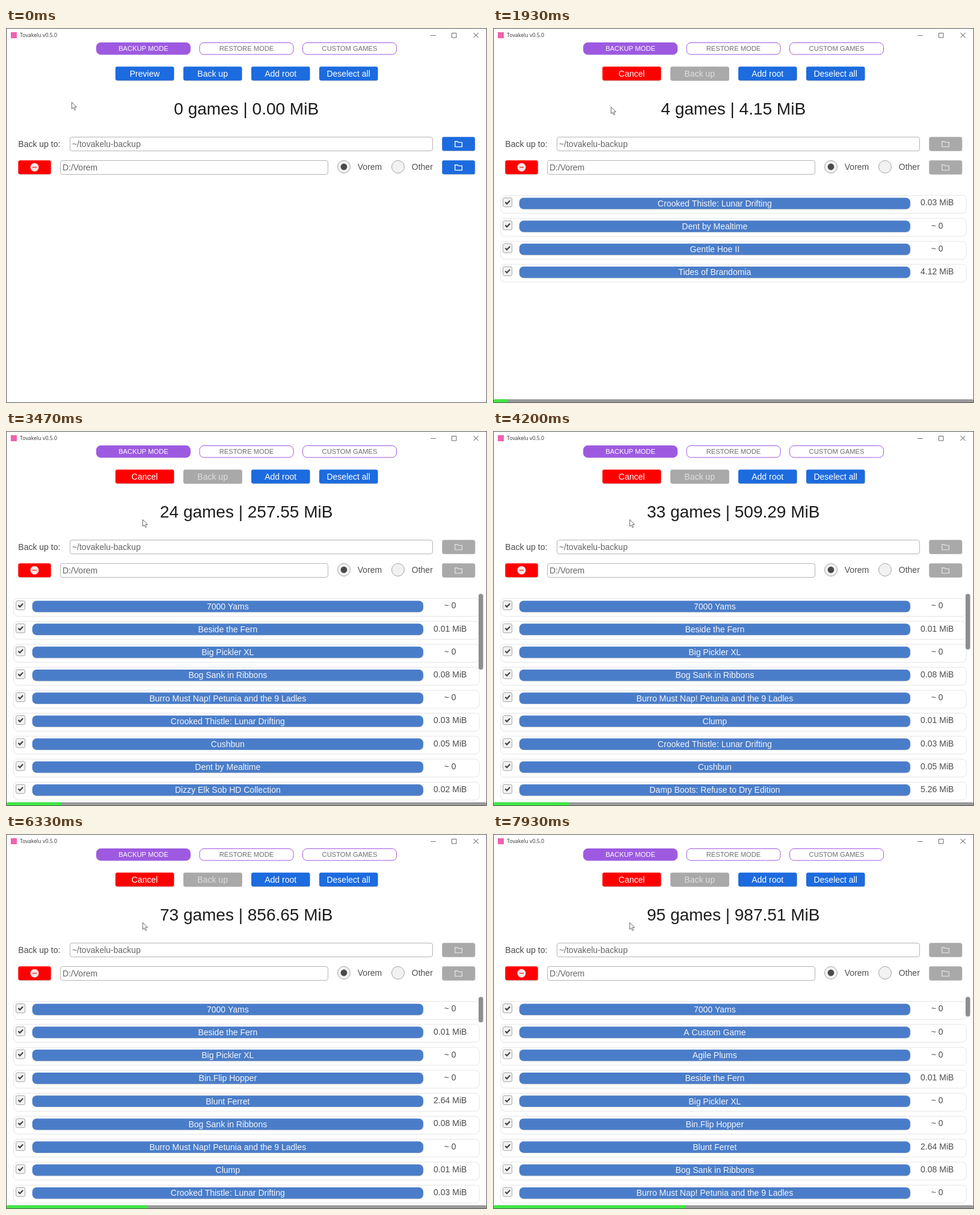
These frames come from a looping animation (800 px wide and 624 px high, 8 s). An HTML page with a canvas:

```html
<!DOCTYPE html>
<html lang="en">
<head>
<meta charset="utf-8">
<title>Backup</title>
<style>
  html, body { margin: 0; width: 100%; height: 100%; overflow: hidden; background: #fff; }
  canvas { display: block; width: 800px; height: 624px; }
</style>
</head>
<body>
<canvas id="stage"></canvas>
<script>
const W = 800, H = 624, LOOP = 8000, STEP = 1000 / 15, START = 1530;
const canvas = document.getElementById('stage');
const dpr = window.devicePixelRatio || 1;
canvas.width = W * dpr;
canvas.height = H * dpr;
const ctx = canvas.getContext('2d');
ctx.scale(dpr, dpr);

const SANS = '"Liberation Sans", Arial, sans-serif';
const BLUE = '#1c6bdf', RED = '#ff0000', GREY = '#a9a9a9', PURPLE = '#9d5ae0';
const ROW_STEP = 38.2, LIST_TOP = 271, LIST_HEIGHT = 346;

// Sorted by title: title, size, game count at which it shows up
const GAMES = [
  ['7000 Yams', '~ 0', 5],
  ['A Custom Game', '~ 0', 80],
  ['Agile Plums', '~ 0', 87],
  ['Beside the Fern', '0.01 MiB', 6],
  ['Big Pickler XL', '~ 0', 7],
  ['Bin.Flip Hopper', '~ 0', 42],
  ['Blunt Ferret', '2.64 MiB', 60],
  ['Bog Sank in Ribbons', '0.08 MiB', 19],
  ['Burro Must Nap! Petunia and the 9 Ladles', '~ 0', 23],
  ['Clump', '0.01 MiB', 26],
  ['Crooked Thistle: Lunar Drifting', '0.03 MiB', 1],
  ['Cushbun', '0.05 MiB', 8],
  ['Damp Boots: Refuse to Dry Edition', '5.26 MiB', 31],
  ['Dent by Mealtime', '~ 0', 2],
  ['Dizzy Elk Sob HD Collection', '0.02 MiB', 9],
  ['Gentle Hoe II', '~ 0', 3],
  ['I Miss You, Captain Turnips!', '0.27 MiB', 10],
  ['Tides of Brandomia', '4.12 MiB', 4]
];

// Milestones of the scan; everything between them is interpolated
const SCAN = [
  { time: START, games: 0, size: 0, bar: 0 },
  { time: 1930, games: 4, size: 4.15, bar: 24 },
  { time: 2670, games: 16, size: 33.78, bar: 56 },
  { time: 4200, games: 33, size: 509.29, bar: 126 },
  { time: 5330, games: 52, size: 816.94, bar: 184 },
  { time: 6330, games: 73, size: 856.65, bar: 236 },
  { time: 7930, games: 95, size: 987.51, bar: 320 }
];

const POINTER = [
  { time: 730, x: 109, y: 123 },
  { time: 1270, x: 212, y: 67 },
  { time: START, x: 212, y: 67 },
  { time: 1930, x: 196, y: 131 },
  { time: 2330, x: 227, y: 147 }
];

const smooth = u => u * u * (3 - 2 * u);

// Value of field `out` where field `by` reaches v
function at(keys, by, v, out, ease = u => u) {
  const i = keys.findIndex(key => key[by] >= v);
  if (i < 0) return keys[keys.length - 1][out];
  if (i === 0) return keys[0][out];
  const a = keys[i - 1], b = keys[i];
  return a[out] + (b[out] - a[out]) * ease((v - a[by]) / (b[by] - a[by]));
}

function box(x, y, w, h, r, fill, stroke) {
  ctx.beginPath();
  ctx.roundRect(x, y, w, h, r);
  if (fill) { ctx.fillStyle = fill; ctx.fill(); }
  if (stroke) { ctx.strokeStyle = stroke; ctx.lineWidth = 1; ctx.stroke(); }
}

function disc(x, y, r, fill, stroke) {
  box(x - r, y - r, 2 * r, 2 * r, r, fill, stroke);
}

function text(str, x, y, color, size = 14, align = 'center', family = SANS) {
  ctx.font = `${size}px ${family}`;
  ctx.textAlign = align;
  ctx.fillStyle = color;
  ctx.fillText(str, x, y);
}

function path(points, color, width, fill) {
  ctx.beginPath();
  points.forEach(([x, y]) => ctx.lineTo(x, y));
  if (fill) { ctx.closePath(); ctx.fillStyle = fill; ctx.fill(); }
  ctx.strokeStyle = color;
  ctx.lineWidth = width;
  ctx.stroke();
}

function button(x, y, w, fill, label, hover) {
  box(x + .7, y + (hover ? 1.4 : .7), w, 23, 3, 'rgba(0,0,0,.25)');
  box(x, y, w, 23, 3, fill);
  if (label) text(label, x + w / 2, y + 16.8, fill === GREY ? '#dedede' : '#fff');
}

function titleBar() {
  box(8, 7, 10, 10, 0, '#f062ae');
  text('Tovakelu v0.5.0', 23, 15.4, '#333', 8.8, 'left', '"Open Sans", "Noto Sans", sans-serif');
  path([[706, 12.5], [715, 12.5]], '#777', 1);
  box(741.5, 8.5, 7.5, 7.5, 0, null, '#666');
  path([[777.5, 8], [785.5, 16]], '#444', 1);
  path([[785.5, 8], [777.5, 16]], '#444', 1);
}

function modes() {
  ['BACKUP MODE', 'RESTORE MODE', 'CUSTOM GAMES'].forEach((label, i) => {
    const x = 150.5 + i * 171.5;
    box(x, 24.5, 156, 19.5, 7, i ? '#fff' : PURPLE, PURPLE);
    text(label, x + 78, 38.2, i ? '#707070' : '#fff', 11.2);
  });
}

function actions(busy, hover) {
  const items = [
    busy ? ['Cancel', RED] : ['Preview', BLUE],
    ['Back up', busy ? GREY : BLUE],
    ['Add root', BLUE],
    ['Deselect all', BLUE]
  ];
  items.forEach(([label, fill], i) => button(182 + i * 113, 64.2, 97.3, fill, label, hover && !i));
}

function folder(y, busy) {
  button(725.3, y, 54.5, busy ? GREY : BLUE);
  const left = 746.8, right = 758.4, top = y + 7.6, low = top + 8.8;
  path([[left, low], [left, top], [left + 4, top], [left + 5.5, top + 1.6],
    [right, top + 1.6], [right, low], [left - .7, low]], busy ? '#dedede' : '#fff', 1.4);
}

function input(value, x, y, w) {
  box(x, y, w, 23, 3.5, '#fff', '#b5b5b5');
  text(value, x + 3.4, y + 16.1, '#666', 14, 'left');
}

function radio(x, label, on) {
  disc(x, 231, 10.5, '#f2f2f2', '#a5a5a5');
  if (on) disc(x, 231, 5.4, '#4a4a4a');
  text(label, x + 22.8, 235.6, '#505050', 14, 'left');
}

function settings(busy) {
  text('Back up to:', 20.3, 197.6, '#4a4a4a', 14, 'left');
  input('~/tovakelu-backup', 106.5, 181.5, 603);
  folder(181.2, busy);

  button(20.3, 220.2, 54.3, RED);
  disc(47.5, 231.7, 7, '#f6e6e6');
  path([[44, 231.7], [51, 231.7]], '#f33', 1.5);
  input('D:/Vorem', 90.5, 220.5, 445);
  radio(562, 'Vorem', true);
  radio(652, 'Other', false);
  folder(220.2, busy);
}

function row([title, size], i) {
  const y = 278.6 + i * ROW_STEP;
  box(12.7, y, 774.6, 29.8, 7, '#fff', '#e5e5e5');
  box(16.6, y + 4, 15, 15, 2.5, '#f2f2f2', '#a3a3a3');
  path([[20.4, y + 11.3], [23.1, y + 14], [28.2, y + 8.6]], '#444', 2.2);
  box(44.3, y + 4.4, 650.1, 18.8, 7, 'rgba(0,0,0,.25)');
  box(43.7, y + 3.8, 650.1, 18.8, 7, '#4a7dc9');
  text(title, 368.8, y + 18.1, '#f2f5fb');
  text(size, 738.7, y + 16.8, '#4c4c4c');
}

function list(count) {
  ctx.save();
  ctx.beginPath();
  ctx.rect(0, LIST_TOP - 1, W, LIST_HEIGHT + 2);
  ctx.clip();
  GAMES.filter(game => game[2] <= count).slice(0, 9).forEach(row);
  const content = count * ROW_STEP + 33;
  if (content > LIST_HEIGHT) box(786, LIST_TOP, 7.6, LIST_HEIGHT ** 2 / content, 3.5, '#8e8e8e');
  ctx.restore();
}

function progressBar(end) {
  box(1, 617.8, 798, 5.6, 2.5, '#999');
  if (end > 2) box(1, 617.8, end - 1, 5.6, [2.5, 0, 0, 2.5], '#42e645');
}

function cursor(x, y) {
  ctx.save();
  ctx.translate(x + .4, y + .4);
  path([[0, 0], [0, 11.3], [2.6, 9], [4.5, 13.2], [6.3, 12.4], [4.5, 8.3], [8, 8.1], [0, 0]],
    '#444', .8, '#fff');
  ctx.restore();
}

function draw(now) {
  // The screen updates 15 times a second, on times rounded to 10 ms
  const t = Math.round(Math.floor((now % LOOP + 3.4) / STEP) * STEP / 10) * 10;
  const busy = t >= START;
  const count = Math.floor(at(SCAN, 'time', t, 'games') + 1e-6);
  const total = at(SCAN, 'games', count, 'size').toFixed(2);
  const x = at(POINTER, 'time', t, 'x', smooth);
  const y = at(POINTER, 'time', t, 'y', smooth);

  ctx.fillStyle = '#fff';
  ctx.fillRect(0, 0, W, H);
  titleBar();
  modes();
  actions(busy, x > 182 && x < 279 && y > 64 && y < 88);
  text(`${count} games | ${total} MiB`, 399.7, 143.8, '#1c1c1c', 28);
  settings(busy);
  list(count);
  if (busy) progressBar(at(SCAN, 'time', t, 'bar'));
  box(.5, .5, W - 1, H - 1, 0, null, '#555');
  cursor(x, y);
}

const begin = performance.now();
function tick() {
  draw(performance.now() - begin);
  requestAnimationFrame(tick);
}
tick();
</script>
</body>
</html>
```
